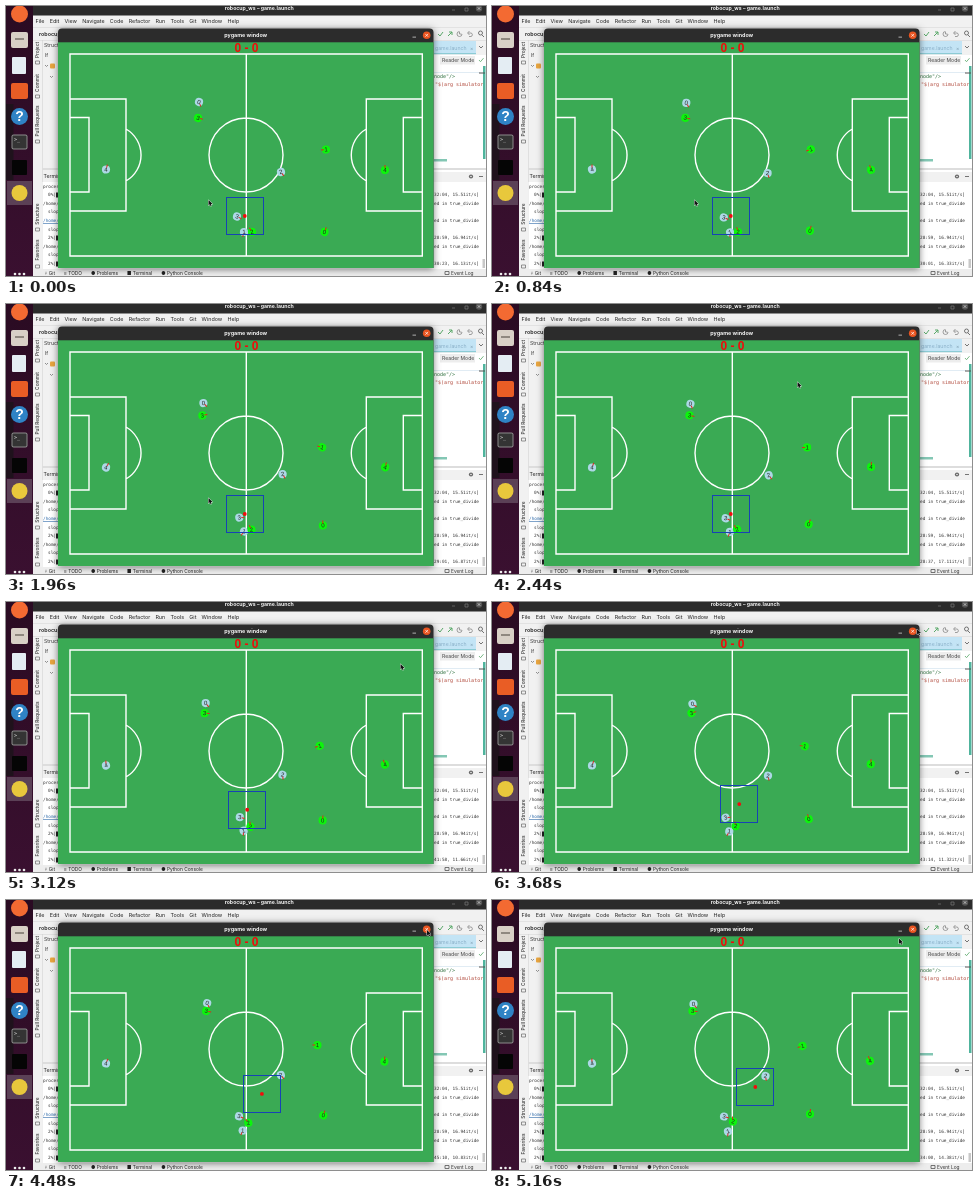
An HTML page with a canvas for the animation above (5.64 s loop, 480x270 px).

```html
<!DOCTYPE html>
<html lang="en">
<head>
<meta charset="utf-8">
<title>Pygame football</title>
<style>
html, body { margin: 0; width: 100%; height: 100%; overflow: hidden; background: #eee; }
canvas { display: block; }
</style>
</head>
<body>
<canvas id="stage" width="480" height="270"></canvas>
<script>
const ctx = document.getElementById('stage').getContext('2d');
const LOOP = 5640, START = 440, END = 5160, STEP = 40, KICK = 2900;
const SANS = 'Inter, sans-serif', MONO = '"DejaVu Sans Mono", monospace', BOLD = '"Liberation Sans", sans-serif';
const BLUE = '#add8e6', GREEN = '#0cf50c';

// Each player runs along a quadratic curve: start, control point, end.
const PLAYERS = [
  { team: BLUE, number: 0, heading: .9, path: [[193, 96], [201, 101], [201.5, 104]] },
  { team: GREEN, number: 3, heading: 0, path: [[192, 112], [200, 111], [200.5, 111]] },
  { team: BLUE, number: 4, heading: -1.3, path: [[100, 163.5], [100, 163.5], [100, 163.5]] },
  { team: BLUE, number: 2, heading: 1.2, path: [[275, 166], [279, 173], [273.5, 176]] },
  { team: GREEN, number: 1, heading: 3.1, path: [[320, 143.5], [313.5, 142.5], [310.5, 146]] },
  { team: GREEN, number: 4, heading: -1.6, path: [[379, 164], [379.5, 163], [378, 161]] },
  { team: BLUE, number: 3, heading: .2, path: [[231, 210.5], [236, 216], [232, 216.5]] },
  { team: BLUE, number: 1, heading: 1.9, path: [[238, 226], [238.5, 228], [236, 231.5]] },
  { team: GREEN, number: 2, heading: -1.9, path: [[246, 226], [246, 226.5], [241, 221.5]] },
  { team: GREEN, number: 0, heading: -1.5, path: [[318.5, 226], [315, 218.5], [318, 214]] }
];
// Key points: time, then the values reached at that time.
const POINTER = [[1960, 202.5, 194], [2440, 305.5, 78], [3120, 394.5, 62], [3680, 425, 27], [4480, 421, 30], [END, 407, 38.5]];
const RATE = [[START, 16.13], [2440, 17.11], [3120, 11.66], [4480, 10.83], [END, 14.38]];

const clamp = (v, lo, hi) => Math.min(hi, Math.max(lo, v));
const mix = (a, b, f) => a + (b - a) * f;
const progress = (t, from, to) => clamp((t - from) / (to - from), 0, 1);

function between(keys, t) {
  const next = clamp(keys.findIndex(key => key[0] >= t), 1, keys.length - 1);
  const [from, ...a] = keys[next - 1], [to, ...b] = keys[next];
  return a.map((v, i) => mix(v, b[i], progress(t, from, to)));
}
function onCurve([a, b, c], f) {
  return a.map((v, i) => mix(mix(v, b[i], f), mix(b[i], c[i], f), f));
}

function rect(x, y, w, h, color) {
  ctx.fillStyle = color;
  ctx.fillRect(x, y, w, h);
}
function round(x, y, w, h, r, color) {
  ctx.fillStyle = color;
  ctx.beginPath();
  ctx.roundRect(x, y, w, h, r);
  ctx.fill();
}
function disc(x, y, r, color) {
  round(x - r, y - r, 2 * r, 2 * r, r, color);
}
function stroke(path, color, width = .8) {
  ctx.strokeStyle = color;
  ctx.lineWidth = width;
  ctx.stroke(new Path2D(path));
}
function text(str, x, y, size, color = '#333', family = SANS, weight = 400, align = 'left') {
  ctx.font = `${weight} ${size}px ${family}`;
  ctx.fillStyle = color;
  ctx.textAlign = align;
  ctx.textBaseline = 'middle';
  ctx.fillText(str, x, y);
}
function row(labels, x, y, size, gap) {
  for (const label of labels) {
    text(label, x, y, size, '#222');
    x += ctx.measureText(label).width + gap;
  }
}
function placed(x, y, angle, draw) {
  ctx.save();
  ctx.translate(x, y);
  ctx.rotate(angle);
  draw();
  ctx.restore();
}

function drawDock() {
  const shade = ctx.createLinearGradient(0, 0, 0, 270);
  shade.addColorStop(0, '#2a0b22');
  shade.addColorStop(1, '#3a1030');
  rect(0, 0, 27, 270, shade);
  rect(0, 98, 7.5, 76, '#1f121c');
  rect(1, 175, 25, 24, '#5b4056');
  disc(13.5, 8, 8.5, '#f36a32');
  round(5, 26, 17, 16, 2, '#d8d0c6');
  rect(9, 32, 9, 2, '#8f887f');
  round(6, 51, 14, 17, 1, '#e4edf3');
  round(5, 77, 17, 16, 2, '#e95d25');
  disc(13.5, 110.5, 8.5, '#2f83c5');
  text('?', 13.5, 111, 14, '#fff', BOLD, 700, 'center');
  round(5.5, 128.5, 16, 15, 2, '#8b8b8b');
  round(6.5, 129.5, 14, 13, 1, '#343434');
  text('>_', 8, 134, 5, '#eee', MONO);
  round(6, 154, 15, 15, 1, '#050505');
  disc(13.5, 187, 8, '#e8c83c');
  for (const x of [9, 13.5, 18]) disc(x, 268, 1.3, '#eee');
}

function drawSideLabel(label, y) {
  placed(31.5, y, -Math.PI / 2, () => text(label, 0, 0, 4.8, '#333', SANS, 500, 'center'));
}

function drawEditor() {
  rect(27, 0, 453, 270, '#f1f1f1');
  rect(27, 0, 453, 9.5, '#2b2b2b');
  text('robocup_ws – game.launch', 253.2, 2.6, 5.2, '#f4f4f4', SANS, 700, 'center');
  stroke('M446 4h3M459 2h3v3h-3z', '#777', .7);
  disc(473, 2.5, 3.2, '#555');
  stroke('M471.7 1.2l2.6 2.6m0-2.6l-2.6 2.6', '#eee', .6);

  row(['File', 'Edit', 'View', 'Navigate', 'Code', 'Refactor', 'Run', 'Tools', 'Git', 'Window', 'Help'], 29.5, 15.5, 5.4, 5.2);
  rect(27, 21, 453, .5, '#d2d2d2');
  text('robocup_ws', 33, 28, 5.4, '#222', SANS, 600);
  stroke('M432 28l2 2 3-4M442 30l4-4m-3 0h3v3', '#59a869', 1);
  stroke('M456 28a2.5 2.5 0 1 1-2.5-2.5M453.5 26v2h2M462 27h3a1.8 1.8 0 0 1 0 3.5h-2M463.5 25l-2 2 2 2', '#888');
  stroke('M476.5 27a2 2 0 1 1-4 0a2 2 0 1 1 4 0M476 29l2 2', '#555');

  rect(27, 34, 453, .5, '#d2d2d2');
  text('Structure', 38, 39, 5.2);
  rect(428, 35, 42, 13, '#c3e4f5');
  rect(428, 47, 42, 1.2, '#8ccbd5');
  text('game.launch', 429, 42, 5.2, '#8ab0c8');
  text('×', 464, 42, 5, '#7b9aae');
  stroke('M473 40l2 2 2-2', '#555');
  text('If', 39, 49, 5);
  rect(428, 49, 52, 117, '#fff');
  rect(434, 50, 35, 8.5, '#ededed');
  text('Reader Mode', 436, 54.3, 5.1, '#444');
  stroke('M473 54l1.5 1.7 3-3.5', '#59a869');
  rect(428, 66, 46, .7, '#d5e4ef');
  text('node"/>', 428, 71, 5, '#2d6f3d', MONO);
  text('"$(arg simulator', 429, 79, 5, '#b0483a', MONO);
  rect(477, 60, 2.5, 93, '#50b49d');
  rect(473, 66.5, 6, 1, '#555');
  rect(428, 153, 13, 2.5, '#83c7b4');
  stroke('M39 59l1.5 1.5L42 59M44 70l1.5 1.5L47 70', '#777');
  round(44, 57.5, 5, 5, 1, '#e8a540');

  rect(36, 34, .5, 229, '#ccc');
  drawSideLabel('Project', 44);
  drawSideLabel('Commit', 77);
  drawSideLabel('Pull Requests', 115);
  drawSideLabel('Structure', 208);
  drawSideLabel('Favorites', 244);
  for (const y of [55, 89, 134, 222, 259]) stroke(`M29.5 ${y}h4v3h-4z`, '#777');
}

function drawTerminal(t) {
  const mono = (str, x, y, color) => text(str, x, y, 4.4, color, MONO);
  rect(36, 162, 444, 2, '#ddd');
  text('Terminal', 37.5, 170.5, 5.2, '#222');
  disc(465, 170.5, 2.1, '#666');
  disc(465, 170.5, .8, '#f1f1f1');
  rect(473, 170, 4, .8, '#555');
  rect(36.5, 176, 444, 87, '#fff');

  const [rate] = between(RATE, t);
  const left = Math.round(mix(29404, 29334, progress(t, START, END)) / rate);
  const clock = `${Math.floor(left / 60)}:${String(left % 60).padStart(2, '0')}`;
  mono('process', 37, 180.5);
  const bar = (percent, status, y) => {
    mono(`${percent}%|`, 42, y);
    rect(50, y - 2.5, 2, 5, '#222');
    mono(status, 428, y);
  };
  bar(0, '32:04, 15.51it/s]', 189);
  bar(2, '28:59, 16.94it/s]', 232);
  bar(2, `${clock}, ${rate.toFixed(2)}it/s]`, 258);
  for (const y of [197.5, 215, 240.5]) {
    mono('/home/', 37, y, y === 215 ? '#2c68a8' : '#333');
    mono('slope', 42, y + 8.7);
    mono('ed in true_divide', 428, y);
  }
  rect(37, 217, 16, .6, '#2c68a8');
  rect(476.5, 253, 2.5, 9, '#c8c8c8');

  rect(27, 263, 453, 7, '#ededed');
  row(['⑂ Git', '≡ TODO', '● Problems', '■ Terminal', '● Python Console'], 38.5, 267.5, 4.8, 9);
  text('Event Log', 445, 267.5, 4.8);
  stroke('M439 265.5h4v3h-4z', '#555');
}

function drawPitch() {
  ctx.save();
  ctx.shadowColor = '#0008';
  ctx.shadowBlur = 7;
  ctx.shadowOffsetY = 1;
  round(52, 22.5, 375.5, 239.5, [4, 4, 0, 0], '#2c2c2c');
  ctx.restore();
  text('pygame window', 239.7, 29.8, 5.4, '#f4f4f4', SANS, 700, 'center');
  rect(406.5, 30.7, 3.5, .8, '#ccc');
  disc(420.7, 29.3, 3.8, '#e95420');
  stroke('M419.3 27.9l2.8 2.8m0-2.8l-2.8 2.8', '#fff', .7);
  rect(52, 36.3, 375.5, 225.7, '#3aaa54');
  stroke('M64 48H416.3V250H64ZM240.3 48V250M64 93H120V205H64M64 111.5H83V186H64' +
    'M416.3 93H360.3V205H416.3M416.3 111.5H397.3V186H416.3' +
    'M203 149a37 37 0 1 1 74 0a37 37 0 1 1-74 0' +
    'M120 123a30 30 0 0 1 0 52M360.3 123a30 30 0 0 0 0 52', '#fff', 1.4);
  text('0 - 0', 240.5, 42.5, 12, '#f00b0b', BOLD, 700, 'center');
}

function drawPlayer({ team, number, heading, path }, t) {
  const [x, y] = onCurve(path, progress(t, START, END));
  const sway = .3 * Math.sin(t / 330 + number * 2);
  placed(x, y, sway, () => {
    disc(0, 0, 4.1, team);
    text(number, 0, .3, 6, '#222', BOLD, 400, 'center');
    ctx.rotate(heading);
    stroke('M2 0h3', '#e3251c', 1);
  });
}

function drawBall(t) {
  const f = progress(t, KICK, END);
  const x = mix(238.8, 263.3, f), y = mix(210, 187, f);
  ctx.strokeStyle = '#1742b5';
  ctx.lineWidth = 1;
  ctx.strokeRect(Math.floor(x - 18.5) + .5, Math.floor(y - 18.5) + .5, 37, 37);
  disc(x, y, 1.9, '#f20c0c');
}

function drawPointer(t) {
  const [x, y] = between(POINTER, t);
  const arrow = 'M0 0V5.4L1.3 4.3 2.2 6.2 3.1 5.8 2.3 3.9H4Z';
  placed(x, y, 0, () => {
    stroke(arrow, '#fff');
    ctx.fillStyle = '#111';
    ctx.fill(new Path2D(arrow));
  });
}

function frame(now) {
  const t = clamp(Math.floor(now % LOOP / STEP) * STEP, START, END);
  drawEditor();
  drawTerminal(t);
  drawDock();
  drawPitch();
  PLAYERS.forEach(player => drawPlayer(player, t));
  drawBall(t);
  drawPointer(t);
  requestAnimationFrame(frame);
}
requestAnimationFrame(frame);
</script>
</body>
</html>
```
